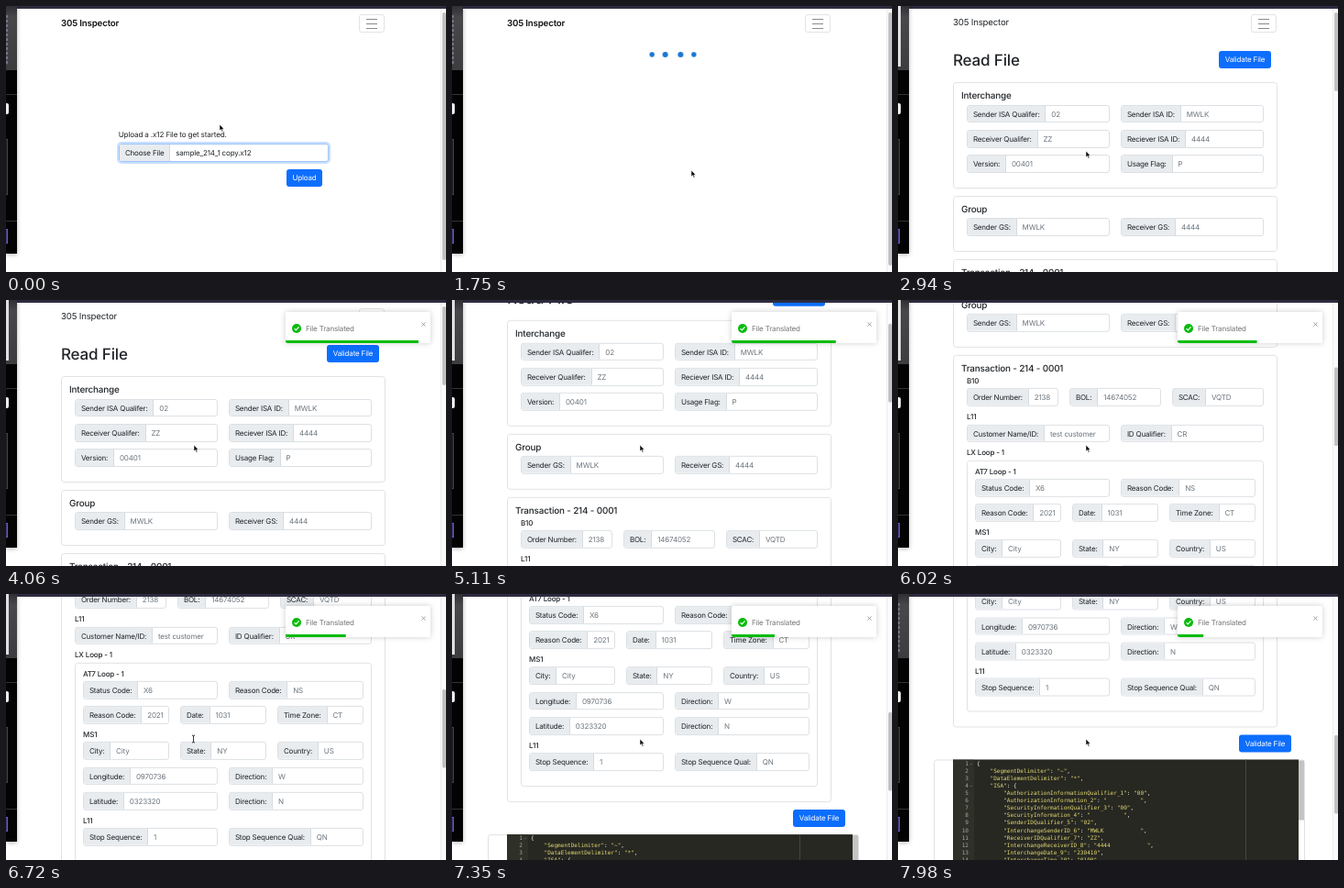
An HTML page for the animation above (8 s loop, 480 by 290 pixels).

```html
<!DOCTYPE html>
<html lang="en">
<head>
<meta charset="utf-8">
<title>File reader</title>
<style>
@property --scroll { syntax: "<number>"; inherits: true; initial-value: 0; }
html, body { margin: 0; width: 100%; height: 100%; overflow: hidden; background: #fff; }
* { box-sizing: border-box; }
#stage {
  position: relative; width: 480px; height: 290px; overflow: hidden; background: #fff;
  font: 8px/1 Inter, Roboto, sans-serif; letter-spacing: -.02em; color: #212529;
  white-space: nowrap; text-rendering: geometricPrecision;
  animation: scroll 8s linear infinite;
}
#stage div, #stage svg { position: absolute; }

/* window chrome */
.bar { left: 11px; top: 0; width: 469px; height: 3px; background: #2e2c40; }
.side { left: 0; top: 0; width: 12px; height: 270px; background: #030303; box-shadow: 0 1px 5px rgba(0,0,0,.3); overflow: hidden; }
.side .head { width: 12px; height: 70px; background: linear-gradient(#2f2f34, #48484a 12px, #3d3d3f); }
.side .code { left: 0; top: 10px; width: 2px; height: 54px; background: repeating-linear-gradient(#77718c 0 3px, #48484a 3px 5px); }
.side .pale { left: 0; top: 0; width: 3px; height: 66px; background: #e0e0e2; animation: pale 8s step-end infinite; }
.side .rule { width: 12px; height: 1px; background: #333; }
.side .tag { left: -3px; top: 106px; width: 6px; height: 12px; border-radius: 2px; background: #eee; }
.side .box { left: -3px; top: 145px; width: 5px; height: 61px; border: 1px solid #444; background: #1c1c1c; }
.side .key { left: -3px; top: 243px; width: 5px; height: 16px; border: 1px solid #6d5bc4; background: #40357c; }
.view { left: 12px; top: 3px; width: 462px; height: 287px; overflow: hidden; }
.page { left: -12px; top: -3px; width: 480px; height: 290px; }
.track { left: 474px; top: 3px; width: 6px; height: 287px; background: #fafafa; border-left: 1px solid #ececec; }
.thumb { left: 475.5px; top: 7px; width: 4px; border-radius: 2px; background: #c1c1c1; }
.thumb.upload { height: 270px; }
.thumb.loading { height: 276px; }
.thumb.after { height: 86px; transform: translateY(calc(var(--scroll) * .306px)); }

/* scenes */
.upload { animation: upload 8s step-end infinite; }
.loading { animation: loading 8s step-end infinite; }
.before { animation: before 8s step-end infinite; }
.after { animation: after 8s step-end infinite; }
@keyframes upload { 0% { visibility: visible } 14.125%, 100% { visibility: hidden } }
@keyframes loading { 0% { visibility: hidden } 14.125% { visibility: visible } 35.875%, 100% { visibility: hidden } }
@keyframes before { 0% { visibility: visible } 35.875%, 100% { visibility: hidden } }
@keyframes after { 0% { visibility: hidden } 35.875%, 100% { visibility: visible } }
@keyframes pale { 0% { visibility: hidden } 35.875% { visibility: visible } 94%, 100% { visibility: hidden } }

/* shared parts */
.t { line-height: 0; height: 0; }
.brand { font-size: 9.6px; }
.bold { font-size: 9.7px; font-weight: 600; color: #111; }
.hint { font-size: 8.15px; }
.h1 { font-size: 17px; font-weight: 500; }
.h2 { font-size: 9.9px; font-weight: 500; }
.h3 { font-weight: 500; }
.menu { left: 385px; top: 8.5px; width: 28px; height: 20px; border: 1px solid #e2e3e5; border-radius: 3px; }
.menu::before { content: ""; position: absolute; left: 7px; top: 4.5px; width: 12px; height: 9px;
  border: solid #8a8a8a; border-width: 1px 0; background: linear-gradient(#8a8a8a, #8a8a8a) 0 50% / 100% 1px no-repeat; }
.btn { height: 19px; border-radius: 3px; background: #0d6efd; color: #fff; text-align: center; line-height: 19px; }
.card { border: 1px solid #e1e2e4; border-radius: 3.5px; }
#stage .field { display: flex; height: 19.8px; border: .7px solid #dce0e4; border-radius: 3px; overflow: hidden; line-height: 18.6px; }
.field b { font-weight: 400; padding: 0 5.9px; letter-spacing: -.023em; background: #e9ecef; border-right: .7px solid #d6dbdf; }
.field i { font-style: normal; padding-left: 5.9px; color: #6c757d; }
.file { animation: blur 8s linear infinite; }
.file i { color: #212529; }
@keyframes blur {
  0%, 3.5% { border-color: #9dc4fb; box-shadow: 0 0 0 2px rgba(13,110,253,.22); }
  4.4%, 100% { border-color: #dce0e4; box-shadow: 0 0 0 2px rgba(13,110,253,0); }
}
.send { animation: send 8s linear infinite; }
@keyframes send {
  0%, 3.5% { background: #0d6efd; box-shadow: 0 0 0 2px rgba(49,132,253,0); }
  4.4%, 100% { background: #0b5ed7; box-shadow: 0 0 0 2px rgba(49,132,253,.5); }
}

/* loader: dots spread from the centre and return */
.dot { left: 236.85px; top: 49.1px; width: 7.8px; height: 7.8px; border-radius: 50%; background: #1976d2;
  animation: 1.6s ease -.48s infinite; }
.d0 { animation-name: far } .d1 { animation-name: mid } .d2 { animation-name: near }
.flip { left: 481.5px; top: 0; width: 0; height: 0; transform: scaleX(-1); }
@keyframes far {
  25% { transform: translateX(-8.35px) scale(.75) } 50% { transform: translateX(-25px) scale(.6) }
  75% { transform: translateX(-41.7px) scale(.5) } 95% { transform: translateX(0) scale(1) }
}
@keyframes mid {
  25% { transform: translateX(-8.35px) scale(.75) } 50%, 75% { transform: translateX(-25px) scale(.6) }
  95% { transform: translateX(0) scale(1) }
}
@keyframes near {
  25%, 75% { transform: translateX(-8.35px) scale(.75) } 95% { transform: translateX(0) scale(1) }
}

/* result page */
#form { left: 0; top: 0; width: 480px; height: 960px; transform: translateY(calc(var(--scroll) * -1px)); }
@keyframes scroll {
  0% { --scroll: 0 }
  54.4% { --scroll: 0; animation-timing-function: ease-in }
  63.875% { --scroll: 61 }
  75.25% { --scroll: 216 }
  84% { --scroll: 316 }
  99.75%, 100% { --scroll: 479.5 }
}
.frame { left: 39px; top: 659.5px; width: 405px; height: 300px; border: 1px solid #e1e2e4; border-radius: 3px; }
.editor { left: 60px; top: 659.5px; width: 377px; height: 300px; background: #272822; color: #f8f8f2; overflow: hidden;
  font: 6.05px/8.1px "DejaVu Sans Mono", monospace; letter-spacing: 0; white-space: pre; }
.editor span { color: #e6db74; }
.gutter { left: 0; top: 0; width: 23px; height: 300px; background: #2f3129; color: #a5a69b; }
.nums { right: 6px; top: 1.2px; text-align: right; }
.folds { left: 18px; top: 1.2px; }
.lines { left: 26px; top: 1.2px; }
.margin { left: 318.5px; top: 0; width: 1px; height: 300px; background: #45463f; }
.grip { left: 437px; top: 660.5px; width: 6px; height: 65px; background: #c4c4c4; }

.toast { left: 305px; top: 13px; width: 158px; height: 34px; background: #fff; border-radius: 2px; overflow: hidden;
  color: #757575; }
.lift { left: 0; top: 0; width: 480px; height: 60px; filter: drop-shadow(0 .5px 3px rgba(0,0,0,.2));
  animation: bounce 8s cubic-bezier(.215,.61,.355,1) infinite; }
.progress { left: 0; bottom: 0; width: 158px; height: 3px; background: #07bc0c; transform-origin: 0 0;
  animation: progress 8s linear infinite; }
@keyframes bounce {
  0%, 36.25% { transform: translateX(1560px) } 41.65% { transform: translateX(-13px) }
  43% { transform: translateX(5px) } 44.35% { transform: translateX(-2.6px) }
  45.25%, 100% { transform: none }
}
@keyframes progress { 0%, 45.3% { transform: scaleX(1) } 100% { transform: scaleX(.1747) } }

/* pointer */
.pointer { left: 0; top: 0; width: 0; height: 0; animation: move 8s ease-in-out infinite; }
.pointer svg { left: -4px; top: -5px; overflow: visible; }
.arrow { animation: arrow 8s step-end infinite; }
.beam { animation: beam 8s step-end infinite; }
@keyframes move {
  0% { transform: translate(233px, 129px) }
  3.5%, 14.5% { transform: translate(321px, 187px) }
  16.6% { transform: translate(318px, 186px) }
  21.875% { transform: translate(261px, 179px) }
  25% { transform: translate(255px, 177px) }
  33%, 100% { transform: translate(205px, 158px) }
}
@keyframes arrow { 0% { visibility: visible } 81.8% { visibility: hidden } 84.8%, 100% { visibility: visible } }
@keyframes beam { 0% { visibility: hidden } 81.8% { visibility: visible } 84.8%, 100% { visibility: hidden } }
</style>
</head>
<body>
<div id="stage">
  <div class="track"></div>
  <div class="thumb upload"></div>
  <div class="thumb loading"></div>
  <div class="thumb after"></div>
  <div class="view"><div class="page">
    <div class="before">
      <div class="t bold" style="left:60px;top:19.7px">305 Inspector</div>
      <div class="menu"></div>
    </div>
    <div class="upload">
      <div class="t hint" style="left:122.7px;top:140px">Upload a .x12 File to get started.</div>
      <div class="field file" style="left:123px;top:150px;width:228.5px"><b>Choose File</b><i>sample_214_1 copy.x12</i></div>
      <div class="btn send" style="left:306px;top:178px;width:39px">Upload</div>
    </div>
    <div class="loading">
      <div class="dot d0"></div><div class="dot d1"></div><div class="dot d2"></div>
      <div class="flip"><div class="dot d0"></div><div class="dot d1"></div><div class="dot d2"></div></div>
    </div>
    <div class="after">
      <div id="form">
        <div class="menu"></div>
        <div class="frame"></div>
        <div class="editor">
          <div class="gutter"><div class="nums"></div><div class="folds">-


-</div></div>
          <div class="margin"></div>
          <div class="lines"></div>
        </div>
        <div class="grip"></div>
      </div>
      <div class="lift"><div class="toast">
        <svg style="left:7px;top:13px" width="10" height="10" viewBox="0 0 10 10">
          <circle cx="5" cy="5" r="5" fill="#07bc0c"/>
          <path d="M2.6 5.2 4.3 6.9 7.5 3.3" fill="none" stroke="#fff" stroke-width="1.2"/>
        </svg>
        <div class="t" style="left:22px;top:18px">File Translated</div>
        <svg style="left:148px;top:10.5px" width="5" height="5" viewBox="0 0 5 5">
          <path d="M.5 .5 4.5 4.5M4.5 .5 .5 4.5" stroke="#888" stroke-width=".8"/>
        </svg>
        <div class="progress"></div>
      </div></div>
    </div>
  </div></div>
  <div class="bar"></div>
  <div class="side">
    <div class="head"></div>
    <div class="code"></div>
    <div class="pale"></div>
    <div class="rule" style="top:96px"></div>
    <div class="rule" style="top:234px"></div>
    <div class="tag"></div><div class="box"></div><div class="key"></div>
  </div>
  <div class="pointer">
    <svg class="arrow" width="12" height="16" viewBox="-4 -5 12 16">
      <path d="M0 0V7L1.6 5.6 2.7 8.2 3.9 7.7 2.8 5.2H4.9Z" fill="#000" stroke="#fff" stroke-width=".6"/>
    </svg>
    <svg class="beam" width="12" height="16" viewBox="-4 -5 12 16">
      <path d="M-2-4Q-.5-4-.5-3V3Q-.5 4-2 4M1-4Q-.5-4-.5-3M-.5 3Q-.5 4 1 4" fill="none" stroke="#222" stroke-width=".9"/>
    </svg>
  </div>
</div>
<script>
const form = document.getElementById("form");
const editor = form.querySelector(".editor"), frame = form.querySelector(".frame");

function add(cls, style, html = "") {
  const el = document.createElement("div");
  el.className = cls;
  for (const key in style) el.style[key] = style[key] + "px";
  el.innerHTML = html;
  form.insertBefore(el, frame);
}
const text = (cls, left, top, str) => add("t " + cls, { left, top }, str);
const card = (left, top, width, bottom) => add("card", { left, top, width, height: bottom - top });
const button = (left, top, width) => add("btn", { left, top, width }, "Validate File");

// One row of equal columns, centred on y; each field is "label|value".
function row(left, width, y, ...fields) {
  const gap = 12, w = (width - gap * (fields.length - 1)) / fields.length;
  fields.forEach((field, i) => {
    const [label, value] = field.split("|");
    add("field", { left: left + i * (w + gap), top: y - 9.9, width: w }, `<b>${label}:</b><i>${value}</i>`);
  });
}
const outer = (...args) => row(75, 324, ...args);
const inner = (...args) => row(84, 306, ...args);

text("brand", 60, 18.5, "305 Inspector");
text("h1", 60, 60, "Read File");
button(350, 49, 57);

card(60, 83, 354, 198.5);
text("h2", 69, 98, "Interchange");
outer(117.5, "Sender ISA Qualifer|02", "Sender ISA ID|MWLK");
outer(145, "Receiver Qualifer|ZZ", "Reciever ISA ID|4444");
outer(172.3, "Version|00401", "Usage Flag|P");

card(60, 206.5, 354, 267.5);
text("h2", 69, 222, "Group");
outer(241, "Sender GS|MWLK", "Receiver GS|4444");

card(60, 276, 354, 624.5);
text("h2", 69, 291, "Transaction - 214 - 0001");
text("h3", 75, 303.5, "B10");
outer(322, "Order Number|2138", "BOL|14674052", "SCAC|VQTD");
text("h3", 75, 343, "L11");
outer(361.5, "Customer Name/ID|test customer", "ID Qualifier|CR");
text("h3", 75, 382, "LX Loop - 1");

card(75, 391, 324, 607.5);
text("h3", 84, 402.5, "AT7 Loop - 1");
inner(420.7, "Status Code|X6", "Reason Code|NS");
inner(448, "Reason Code|2021", "Date|1031", "Time Zone|CT");
text("h3", 84, 469, "MS1");
inner(487.2, "City|City", "State|NY", "Country|US");
inner(514.6, "Longitude|0970736", "Direction|W");
inner(542, "Latitude|0323320", "Direction|N");
text("h3", 84, 562.5, "L11");
inner(581.2, "Stop Sequence|1", "Stop Sequence Qual|QN");
button(372, 632.5, 57);

const pair = (indent, key, value) => `${" ".repeat(indent)}"${key}": "${value}",`;
const segments = [
  ["AuthorizationInformationQualifier", "00"], ["AuthorizationInformation", " ".repeat(10)],
  ["SecurityInformationQualifier", "00"], ["SecurityInformation", " ".repeat(10)],
  ["SenderIDQualifier", "02"], ["InterchangeSenderID", "MWLK".padEnd(15)],
  ["ReceiverIDQualifier", "ZZ"], ["InterchangeReceiverID", "4444".padEnd(15)],
  ["InterchangeDate", "230410"], ["InterchangeTime", "0100"]
];
const lines = [
  "{", pair(4, "SegmentDelimiter", "~"), pair(4, "DataElementDelimiter", "*"), '    "ISA": {',
  ...segments.map(([key, value], i) => pair(8, `${key}_${i + 1}`, value))
];
editor.querySelector(".lines").innerHTML = lines.join("\n").replace(/"[^"]*"/g, "<span>$&</span>");
editor.querySelector(".nums").textContent = lines.map((_, i) => i + 1).join("\n");
</script>
</body>
</html>
```
